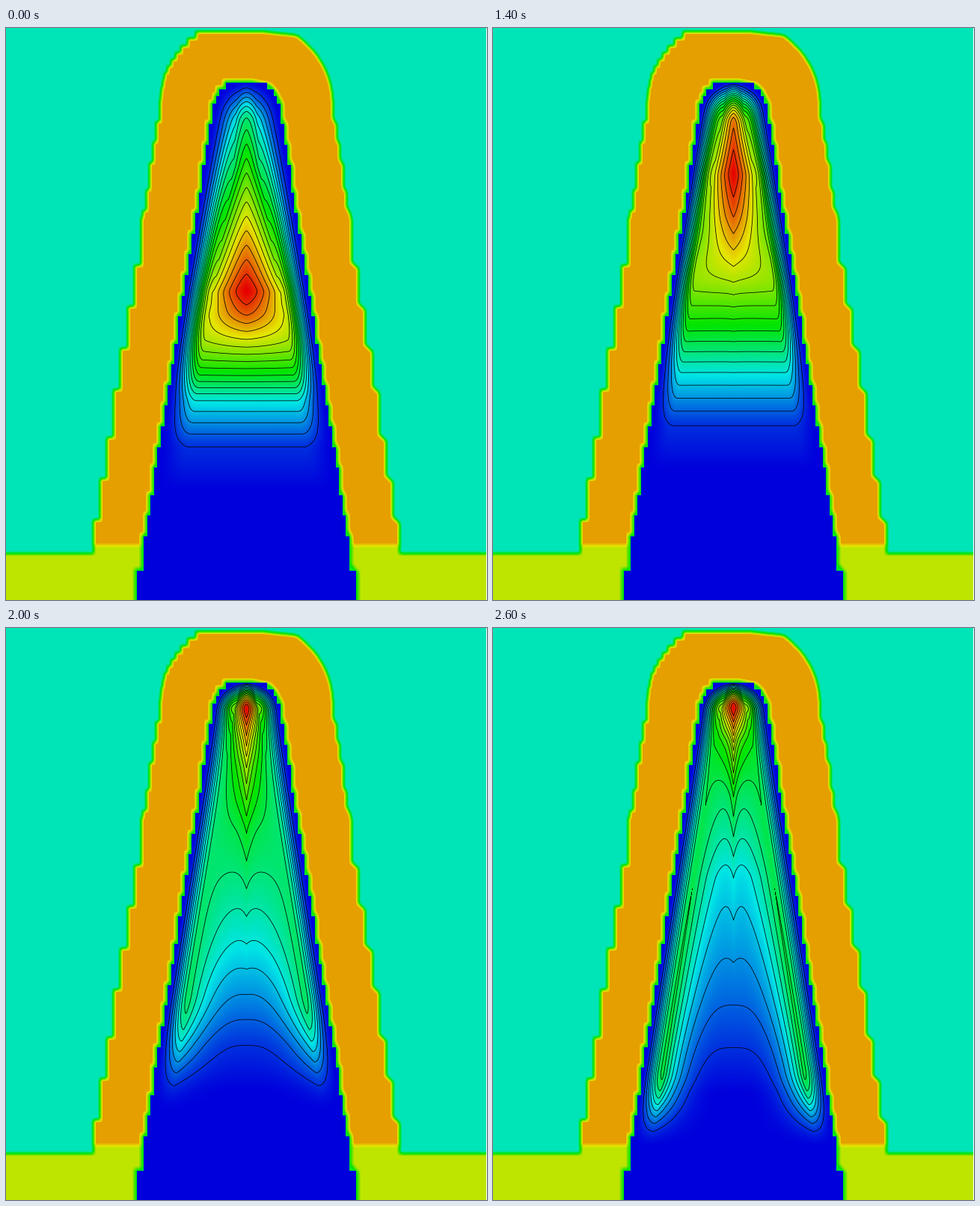
Write a matplotlib script that moves like this. It is 643 by 764 pixels and loops after 4600 ms.

```python
import numpy as np
import matplotlib.pyplot as plt
from matplotlib.animation import ArtistAnimation
from matplotlib.colors import LinearSegmentedColormap

STAGE, W, H, CX = 643, 642, 764, 321.5
STEP, HOLD_IN, HOLD_OUT, LAST = 200, 5, 10, 9
TEAL, LIME, ORANGE, RIM = 0.30, 0.7065, 0.826, 0.45
TOP, PITCH, CELL = 73, 9.18, 4.6      # fin top, mesh row height, mesh step
RUN = 22 / 7                          # mesh rows per step
LEVELS = np.arange(1, 19) / 19

rainbow = LinearSegmentedColormap.from_list("rainbow", [
    (0, 0, 0.865), (0, 0.9, 0.9), (0, 0.9, 0), (0.9, 0.9, 0), (0.9, 0, 0)], N=1024)

rows = np.arange(H) + 0.5
cols = np.arange(W) + 0.5
y = rows[:, None]
R = np.abs(cols - CX)[None, :]


def fin_width(k):
    """Half-width of the fin in mesh row k."""
    w = 64 + CELL * np.floor((k - 15.07) / RUN)
    w = w - CELL * np.where(k < 2, (2 - k) * (3 - k) / 2, 0)
    w = np.where(k > 70, 146.5, np.minimum(w, 138))
    return np.where(k < 0, -20, w)


def gate_width(k):
    """Half-width of the gate: finer mesh above, round cap on top."""
    fine = fin_width(np.maximum(k, 3)) + 70
    coarse = 140.5 + 2 * CELL * np.floor((k - 19.8) / (2 * RUN))
    h = np.clip(-k * PITCH + 24, 0, 92)
    cap = 115 * np.sqrt(1 - (h / 109.6) ** 1.92)
    w = np.where(k < 3, cap, np.where(k < 20, fine, coarse))
    return np.where(k < -7, -20, w)


def outline(width, shift):
    """Inside test: stepped on the left, sloped on the right."""
    k = np.arange(-9, 77)
    nodes = TOP - shift + PITCH * (k + 0.5)
    left = width(np.floor((y - TOP + shift) / PITCH))
    right = np.interp(rows, nodes, width(k))[:, None]
    return np.where(cols < CX, R < left, R < right)


def box_blur(a, n):
    for axis in (0, 1):
        pad = [(0, 0), (0, 0)]
        pad[axis] = (n // 2, n // 2)
        p = np.pad(a, pad, mode="edge")
        size = a.shape[axis]
        a = sum(np.take(p, range(i, i + size), axis=axis) for i in range(n)) / n
    return a


def materials():
    gate = outline(gate_width, 3.5) & (y > 5)
    m = np.where(gate, ORANGE, TEAL)
    m[(y > 702) | (gate & (y > 691))] = LIME
    rim = outline(lambda k: fin_width(k) + 3, 3) & (y > TOP - 3)
    m[rim] = RIM
    return box_blur(m, 7)


def smooth(a, sigma):
    n = 16
    k = np.exp(-0.5 * (np.arange(-n, n + 1) / sigma) ** 2)
    return np.convolve(np.pad(a, n, mode="edge"), k / k.sum(), mode="valid")


def sigmoid(x):
    return 1 / (1 + np.exp(-x))


def slide(s, start, end, when, span):
    """Ease from start to end around step `when`."""
    return end + (start - end) * sigmoid((when - s) / span)


def sin2(q):
    return np.sin(np.pi / 2 * np.clip(q, 0, 1)) ** 2


def axis_profile(s):
    """Density down the middle; the peak climbs and each level follows later."""
    peak = slide(s, 356, 108, 2.6, 0.65)
    lift = 31 * np.exp(-((s - 3.1) / 2) ** 2)
    upper = slide(s, 432, 160, 3.65, 1.0)
    foot = 560 - lift
    ys = [peak, slide(s, 386, 124, 2.95, 0.7), upper,
          slide(s, 468, 220, 4.8, 0.95) - lift,
          slide(s, 500, 310, 6.5, 1.2) - lift, foot, foot + 60]
    below = np.interp(rows, ys, np.array([19, 17, 13, 9, 5, 1, 0]) / 19)
    slope = max(0.0027 - 0.0003 * s, 0)
    a = smooth(below - slope * np.maximum(peak - rows, 0), 4)
    rise = np.clip((rows - TOP) / min(55, peak - TOP), 0, 1)
    cap = np.sin(np.pi / 2 * rise)
    a = np.clip(a * cap, 0, 1)
    return (a / a.max())[:, None], cap[:, None], upper, foot


def side_profile(s, axis, cap, upper, foot):
    """Density along the ridge beside each wall."""
    early = axis * (1 - 0.3 * sigmoid((upper - 35 - y) / 20))
    front = foot + 3 + 18 * max(s - 3, 0)
    length = max(105, 190 - 30 * (s - 5))
    plateau = 0.35 + 0.0125 * (s - 5) + 0.00006 * y
    plateau = plateau + 0.25 * np.exp(-np.maximum(y - 108, 0) / 35)
    late = cap * plateau * sin2((front + 0.2 * length + 4 - y) / length)
    return early + (late - early) * np.clip((s - 3) / 2, 0, 1)


def density(s):
    axis, cap, upper, foot = axis_profile(s)
    side = side_profile(s, axis, cap, upper, foot)

    arch = np.clip((115 - y) / 42, 0, 1)
    w = (46 + 0.159 * (y - 115)) * (1 - arch ** 3) ** 0.4 + 1e-6
    d = np.minimum(28 + 12 * np.exp(-s / 2.5), 0.95 * w)
    ridge = np.maximum(w - d, 0.3 * w)
    t = np.clip(R / ridge, 0, 1) ** np.maximum(1.4, (0.0035 + 0.0003 * s) * y)

    # Narrow crest on the axis, strongest late
    crest = axis * 0.28 * np.clip((s - 2.5) / 6, 0, 1)
    crest = crest * np.clip((y - 100) / 50, 0, 1) * np.clip((500 - y) / 300, 0, 1)
    core = axis - crest
    body = core + (side - core) * t + crest * np.exp(-R / 7)
    return np.clip(body * sin2((w - R) / d), 0, 1)


fig = plt.figure(figsize=(STAGE / 100, H / 100), dpi=100, facecolor="white")
ax = fig.add_axes([0, 0, W / STAGE, 1])
ax.axis("off")

base = materials()
fin = (R < fin_width(np.floor((y - TOP) / PITCH))) & (y > TOP)
scenes = []
for s in range(LAST + 1):
    dens = np.where(fin, density(s), 0)
    im = ax.imshow(np.where(fin, dens, base), cmap=rainbow, vmin=0, vmax=1,
                   extent=(0, W, H, 0), interpolation="nearest", aspect="auto")
    lines = ax.contour(cols, rows, dens, levels=LEVELS, colors="black",
                       linewidths=0.55, zorder=2)
    scenes.append([im, lines])
ax.set_xlim(0, W)
ax.set_ylim(H, 0)

# First and last scenes hold; the rest pass one step each
order = [0] * HOLD_IN + list(range(1, LAST)) + [LAST] * HOLD_OUT
anim = ArtistAnimation(fig, [scenes[i] for i in order], interval=STEP, repeat=True)
plt.show()
```
